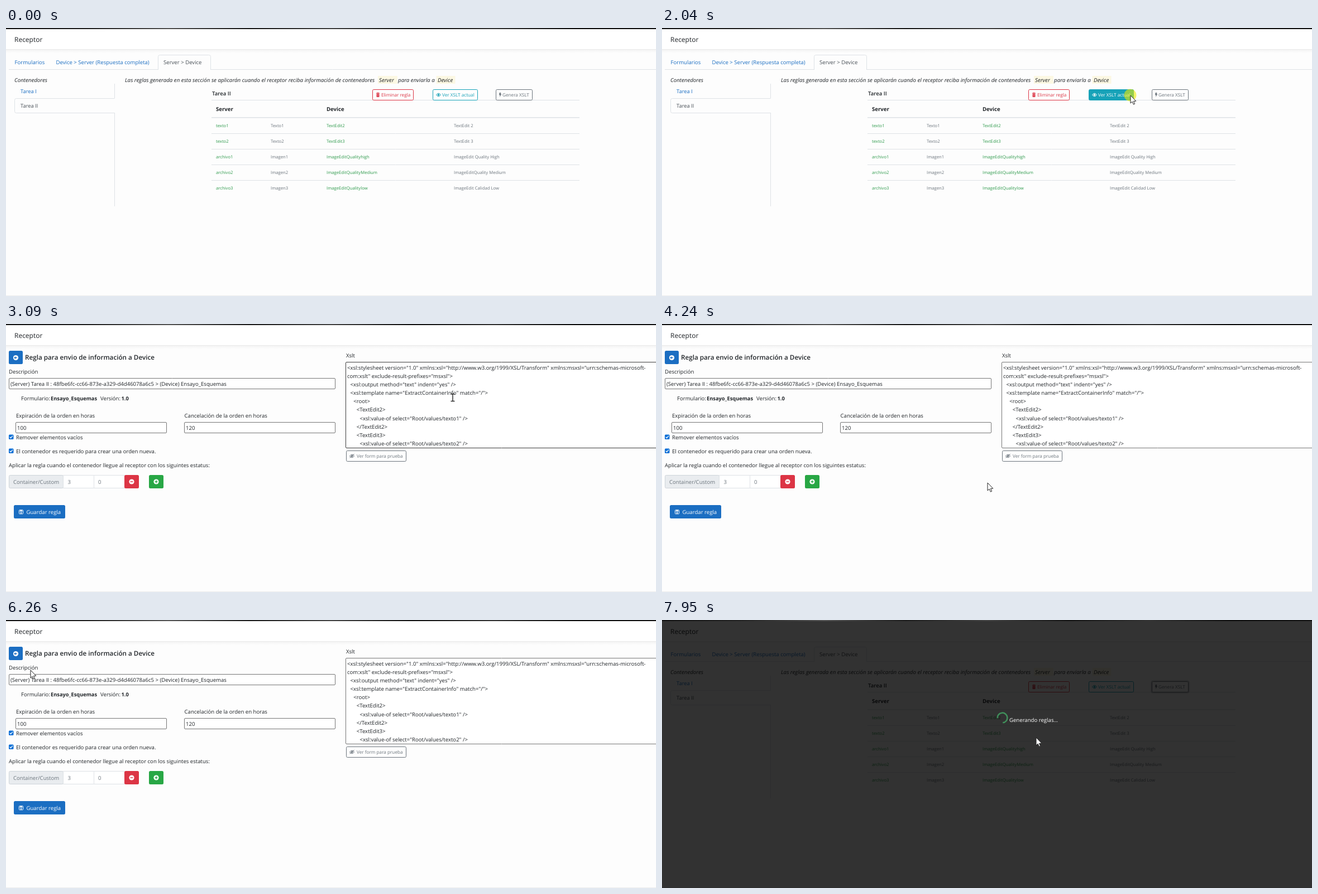
Write an HTML page with a canvas that moves like this. It is 1164x481 px and loops after 8000 ms.

```html
<!DOCTYPE html>
<html lang="es">
<head>
<meta charset="utf-8">
<title>Receptor</title>
<style>
html, body { margin: 0; width: 100%; height: 100%; overflow: hidden; background: #fdfdfd; }
canvas { display: block; width: 1164px; height: 481px; }
</style>
</head>
<body>
<canvas id="stage" width="1164" height="481"></canvas>
<script>
const ctx = document.getElementById('stage').getContext('2d');
const W = 1164, H = 481, LOOP = 8000;
const FAMILY = '"Open Sans", "Noto Sans", sans-serif';
const BASE = 9.6, SMALL = 8.2, CELL = 7.7;
const INK = '#212529', GRAY = '#6c757d', LINE = '#dee2e6', BLUE = '#1b6ec2';
const RED = '#dc3545', TEAL = '#17a2b8', GREEN = '#28a745', PAPER = '#fdfdfd';

// Scene times in ms
const LOAD = 2100, FORM = 2940, BACK = 6550, GENERATE = 7680;

// Pointer stops: time, x, y
const PATH = [
  [670, 1050, 470], [900, 985, 335], [1150, 890, 190], [1410, 826, 122],
  [1800, 834, 120], [2040, 839, 121], [2100, 838, 122], [2500, 808, 130],
  [2730, 805, 130], [3100, 800, 132], [3450, 440, 108], [3700, 480, 215],
  [3900, 578, 290], [4240, 583, 285], [4500, 680, 190], [4740, 560, 90],
  [4900, 400, 104], [5200, 190, 200], [5560, 97, 336], [5910, 92, 342],
  [6110, 92, 342], [6260, 44, 90], [6410, 19, 62], [6600, 19, 62],
  [6900, 260, 170], [7350, 860, 140], [7500, 912, 126], [7680, 913, 126],
  [7950, 670, 211]
];
const CLICKS = [[1950, LOAD], [6420, BACK], [7500, GENERATE]];

function pointer(t) {
  if (t < PATH[0][0]) return null;
  for (let i = 1; i < PATH.length; i++) {
    const [t0, x0, y0] = PATH[i - 1], [t1, x1, y1] = PATH[i];
    if (t <= t1) {
      const u = (t - t0) / (t1 - t0), k = u * u * (3 - 2 * u);
      return { x: x0 + (x1 - x0) * k, y: y0 + (y1 - y0) * k };
    }
  }
  const [, x, y] = PATH[PATH.length - 1];
  return { x, y };
}

const inside = (p, x, y, w, h) => !!p && p.x >= x && p.x <= x + w && p.y >= y && p.y <= y + h;

// y is the middle of the capitals
function text(s, x, y, color = INK, size = BASE, style = '400') {
  ctx.font = `${style} ${size}px ${FAMILY}`;
  ctx.fillStyle = color;
  ctx.fillText(s, x, y + size * 0.36);
}

function rect(x, y, w, h, fill, stroke, r = 0) {
  ctx.beginPath();
  ctx.roundRect(x, y, w, h, r);
  if (fill) { ctx.fillStyle = fill; ctx.fill(); }
  if (stroke) { ctx.strokeStyle = stroke; ctx.lineWidth = 1; ctx.stroke(); }
}

function line(x0, y0, x1, y1, color = LINE, width = 1) {
  ctx.strokeStyle = color;
  ctx.lineWidth = width;
  ctx.beginPath();
  ctx.moveTo(x0, y0);
  ctx.lineTo(x1, y1);
  ctx.stroke();
}

function disc(x, y, r, color) {
  ctx.fillStyle = color;
  ctx.beginPath();
  ctx.arc(x, y, r, 0, Math.PI * 2);
  ctx.fill();
}

function polygon(points, fill, stroke) {
  ctx.beginPath();
  points.forEach(([x, y]) => ctx.lineTo(x, y));
  ctx.closePath();
  ctx.fillStyle = fill;
  ctx.fill();
  if (stroke) { ctx.strokeStyle = stroke; ctx.lineWidth = 1; ctx.lineJoin = 'round'; ctx.stroke(); }
}

const icons = {
  trash(x, y, c) {
    rect(x - 3, y - 3.5, 6, 1.2, c);
    rect(x - 1.2, y - 4.3, 2.4, 1, c);
    rect(x - 2.5, y - 1.8, 5, 5.8, c, null, 0.8);
    for (const d of [-1, 1]) line(x + d, y - 0.8, x + d, y + 3, 'rgba(255,255,255,.7)', 0.5);
  },
  eye(x, y, c) {
    ctx.strokeStyle = c;
    ctx.lineWidth = 1;
    ctx.beginPath();
    ctx.moveTo(x - 4, y);
    ctx.quadraticCurveTo(x, y - 5.5, x + 4, y);
    ctx.quadraticCurveTo(x, y + 5.5, x - 4, y);
    ctx.stroke();
    disc(x, y, 1.7, c);
  },
  hidden(x, y, c) {
    icons.eye(x, y, c);
    line(x - 4, y + 3, x + 4, y - 3.5, c);
  },
  bolt(x, y, c) {
    polygon([[x - 1.3, y - 4], [x + 1.4, y - 4], [x + 0.6, y - 1.4], [x + 2.4, y - 1.4],
      [x - 1, y + 4.2], [x - 0.2, y + 0.4], [x - 2, y + 0.4]], c);
  },
  floppy(x, y, c) {
    rect(x - 3.5, y - 3.5, 7, 7, null, c, 1);
    rect(x - 2, y - 3, 4, 2.2, c);
    disc(x, y + 1.4, 1.2, c);
  }
};

function outlineButton(b, hover, focus) {
  const ink = hover ? '#fff' : b.color;
  if (focus) {
    ctx.globalAlpha = 0.5;
    rect(b.x - 1, 109, b.w + 2, 22, null, b.color, 3);
    ctx.globalAlpha = 1;
  }
  rect(b.x + 0.5, b.y + 0.5, b.w - 1, b.h - 1, hover ? b.color : null, b.color, 2);
  icons[b.icon](b.x + b.ix, b.y + b.h / 2, ink);
  text(b.label, b.x + b.tx, b.y + b.h / 2 + 0.2, ink, SMALL);
}

const BUTTONS = [
  { label: 'Eliminar regla', icon: 'trash', color: RED, x: 656, y: 110, w: 74, h: 20, ix: 10, tx: 16 },
  { label: 'Ver XSLT actual', icon: 'eye', color: TEAL, x: 764, y: 110, w: 81, h: 20, ix: 10.5, tx: 17 },
  { label: 'Genera XSLT', icon: 'bolt', color: GRAY, x: 877, y: 110, w: 66, h: 20, ix: 8, tx: 12 }
];
const PREVIEW = { label: 'Ver form para prueba', icon: 'hidden', color: GRAY, x: 609, y: 227, w: 108, h: 20, ix: 10.5, tx: 19 };

const ROWS = [
  ['texto1', 'Texto1', 'TextEdit2', 'TextEdit 2'],
  ['texto2', 'Texto2', 'TextEdit3', 'TextEdit 3'],
  ['archivo1', 'Imagen1', 'ImageEditQualityhigh', 'ImageEdit Quality High'],
  ['archivo2', 'Imagen2', 'ImageEditQualityMedium', 'ImageEditQuality Medium'],
  ['archivo3', 'Imagen3', 'ImageEditQualitylow', 'ImageEdit Calidad Low']
];
const COLUMNS = [376, 474, 574, 802];

// Leading spaces set the indent
const CODE = [
  '<xsl:stylesheet version="1.0" xmlns:xsl="http://www.w3.org/1999/XSL/Transform" xmlns:msxsl="urn:schemas-microsoft-',
  'com:xslt" exclude-result-prefixes="msxsl">',
  ' <xsl:output method="text" indent="yes" />',
  ' <xsl:template name="ExtractContainerInfo" match="/">',
  '  <root>',
  '   <TextEdit2>',
  '    <xsl:value-of select="Root/values/texto1" />',
  '   </TextEdit2>',
  '   <TextEdit3>',
  '    <xsl:value-of select="Root/values/texto2" />'
];

function header() {
  ctx.fillStyle = PAPER;
  ctx.fillRect(0, 0, W, H);
  const shade = ctx.createLinearGradient(0, 38, 0, 45);
  shade.addColorStop(0, '#e6e6e6');
  shade.addColorStop(0.25, '#f5f5f5');
  shade.addColorStop(1, PAPER);
  ctx.fillStyle = shade;
  ctx.fillRect(0, 38, W, 7);
  rect(0, 2, W, 36, '#fff');
  text('Receptor', 15, 21, INK, 12);
  line(0, 480.5, W, 480.5, '#ececec');
}

function strip() {
  const g = ctx.createLinearGradient(0, 0, W, 0);
  ['#111', '#222', '#555', '#1a1a1a', '#444', '#111', '#333', '#0c0c0c', '#111']
    .forEach((c, i, all) => g.addColorStop(i / (all.length - 1), c));
  ctx.fillStyle = g;
  ctx.fillRect(0, 0, W, 2);
}

function rulesPage(p, focus) {
  line(5, 74.5, W, 74.5);
  rect(272.5, 48.5, 94, 30, PAPER, LINE, 3);
  rect(271, 75, 97, 5, PAPER);
  text('Formularios', 15.5, 62, BLUE);
  text('Device > Server (Respuesta completa)', 89.5, 62, BLUE);
  text('Server > Device', 282, 62, '#495057');

  const note = (s, x) => text(s, x, 93, INK, 9.75, 'italic 400');
  note('Contenedores', 15);
  line(194.5, 100, 194.5, 126);
  line(194.5, 152, 194.5, 320);
  ctx.beginPath();
  ctx.moveTo(194.5, 126.5);
  ctx.arcTo(15.5, 126.5, 15.5, 130, 3);
  ctx.arcTo(15.5, 152.5, 20, 152.5, 3);
  ctx.lineTo(194.5, 152.5);
  ctx.stroke();
  text('Tarea I', 26, 114, BLUE, 9.4);
  text('Tarea II', 26, 140, '#495057', 9.4);

  rect(666, 86, 35, 14, '#fcf8e3');
  rect(770.5, 86, 34, 14, '#fcf8e3');
  note('Las reglas generada en esta sección se aplicarán cuando el receptor reciba información de contenedores', 213);
  note('Server', 668);
  note('para enviarla a', 702);
  note('Device', 773);

  text('Tarea II', 369, 118, INK, BASE, '600');
  line(368, 129.5, 1027, 129.5);
  text('Server', 376, 146, INK, BASE, '700');
  text('Device', 574, 146, INK, BASE, '700');
  rect(368, 160, 659, 1.5, LINE);
  ROWS.forEach((row, i) => {
    const top = 161.5 + i * 27.9;
    if (inside(p, 368, top, 659, 27.8)) rect(369, top, 658, 27.8, 'rgba(0,0,0,.07)');
    if (i) line(368, Math.floor(top) + 0.5, 1027, Math.floor(top) + 0.5);
    row.forEach((s, c) => text(s, COLUMNS[c], top + 14.2, c % 2 ? GRAY : '#2e9a4c', CELL));
  });
  BUTTONS.forEach((b, i) => outlineButton(b, inside(p, b.x, b.y, b.w, b.h), focus === i));
}

function field(p, x, y, w, h, value) {
  rect(x + 0.5, y + 0.5, w - 1, h - 1, '#fff', inside(p, x, y, w, h) ? '#3c3c3c' : '#767676', 1.5);
  if (value) text(value, x + 3, y + h / 2 + 0.3);
}

function check(y, label) {
  rect(5, y - 4.5, 8.5, 8.5, '#0b6fd6', null, 1.5);
  ctx.lineJoin = 'miter';
  ctx.strokeStyle = '#fff';
  ctx.lineWidth = 1.3;
  ctx.beginPath();
  ctx.moveTo(6.8, y - 0.2);
  ctx.lineTo(8.6, y + 1.8);
  ctx.lineTo(11.8, y - 2.4);
  ctx.stroke();
  text(label, 18, y + 0.5);
}

function roundIcon(x, y, color, kind) {
  disc(x, y, 4.6, '#fff');
  line(x - 2.4, y, x + 2.4, y, color, 1.4);
  if (kind === 'plus') line(x, y - 2.4, x, y + 2.4, color, 1.4);
  if (kind === 'back') polygon([[x - 3.2, y], [x - 0.3, y - 2.6], [x - 0.3, y + 2.6]], color);
}

function solidButton(p, x, y, w, h, color, hoverColor) {
  rect(x, y, w, h, inside(p, x, y, w, h) ? hoverColor : color, null, 2.5);
}

function formPage(p) {
  solidButton(p, 5, 48, 25, 24, BLUE, '#155a9e');
  roundIcon(17.5, 60.5, BLUE, 'back');
  text('Regla para envio de información a Device', 34, 59.5, INK, 11.7, '600');
  text('Descripción', 5, 85.5);
  field(p, 5, 97, 585, 20, '(Server) Tarea II : 48fbe6fc-cc66-873e-a329-d4d46078a6c5 > (Device) Ensayo_Esquemas');
  text('Formulario:', 27, 134);
  text('Ensayo_Esquemas', 80, 134, INK, 9.3, '700');
  text('Versión:', 169, 134);
  text('1.0', 206.5, 134, INK, 9.3, '700');
  text('Expiración de la orden en horas', 18, 164.5);
  text('Cancelación de la orden en horas', 319.5, 164.5);
  field(p, 17, 176, 271, 20, '100');
  field(p, 319, 176, 271, 20, '120');
  check(203, 'Remover elementos vacíos');
  check(228, 'El contenedor es requerido para crear una orden nueva.');
  text('Aplicar la regla cuando el contenedor llegue al receptor con los siguintes estatus:', 5, 254);

  rect(5.5, 271.5, 97, 23, '#e9ecef', '#ced4da', 2);
  rect(102.5, 271.5, 55, 23, '#fff', LINE);
  rect(157.5, 271.5, 55, 23, '#fff', LINE);
  text('Container/Custom', 13, 283.5, GRAY);
  text('3', 110.5, 283.5, GRAY);
  text('0', 165, 283.5, GRAY);
  solidButton(p, 212, 271, 26, 24, RED, '#c02838');
  roundIcon(225, 283, RED, 'minus');
  solidButton(p, 256, 271, 26, 24, GREEN, '#218838');
  roundIcon(269, 283, GREEN, 'plus');

  solidButton(p, 14, 325, 92, 24, BLUE, '#155a9e');
  icons.floppy(27, 337.3, '#fff');
  text('Guardar regla', 36.5, 337.5, '#fff');

  text('Xslt', 609, 56.5);
  field(p, 608, 68, 570, 155);
  CODE.forEach((s, i) => {
    const code = s.trimStart();
    text(code, 611 + (s.length - code.length) * 5.6, 78.5 + i * 15.1);
  });
  outlineButton(PREVIEW, inside(p, PREVIEW.x, PREVIEW.y, PREVIEW.w, PREVIEW.h));
}

function overlay(message, elapsed, alpha) {
  rect(0, 2, W, H - 2, 'rgba(0,0,0,.8)');
  const gap = elapsed / 750 * Math.PI * 2;
  ctx.globalAlpha = alpha;
  ctx.strokeStyle = '#45b06a';
  ctx.lineWidth = 2.5;
  ctx.beginPath();
  ctx.arc(609.5, 175.5, 8.9, gap + Math.PI / 4, gap + Math.PI * 1.75);
  ctx.stroke();
  ctx.globalAlpha = 1;
  text(message, 622, 180, '#fff');
}

const cursors = {
  arrow() {
    polygon([[0, 0], [0, 14], [3.2, 11.2], [5.4, 16.2], [7.6, 15.2], [5.5, 10.4], [9.8, 10.2]], '#fff', '#222');
  },
  beam(dark) {
    const c = dark ? '#222' : '#fff';
    line(0, -6.5, 0, 6.5, c, 1.4);
    for (const y of [-6.5, 6.5]) line(-3.5, y, 3.5, y, c, 1.4);
  },
  hand() {
    polygon([[-1.5, 1], [0, 0], [1.4, 1], [1.6, 5.5], [4, 5.3], [6.5, 6.3], [8.8, 7.5],
      [8.8, 11.5], [7.2, 14], [7.2, 17], [0.6, 17], [0.2, 14.6], [-4.5, 9.8], [-4, 8.4], [-1.4, 10]], '#fff', '#222');
    for (const x of [2, 4.3, 6.5]) line(x, 6, x, 9, '#555', 0.7);
  }
};

function cursorKind(t, p, form, busy) {
  if (busy) return t < FORM && t > 2250 ? 'beam' : 'arrow';
  if (form) {
    if (inside(p, 608, 68, 570, 155) || inside(p, 5, 97, 585, 20)) return 'beam';
    if (inside(p, 14, 325, 92, 24) || inside(p, 5, 48, 25, 24)) return 'hand';
    return 'arrow';
  }
  return t > BACK && BUTTONS.some(b => inside(p, b.x, b.y, b.w, b.h)) ? 'hand' : 'arrow';
}

function draw(t) {
  const p = pointer(t);
  const form = t >= FORM && t < BACK;
  const fetching = t >= LOAD && t < FORM, generating = t >= GENERATE;
  const busy = fetching || generating;
  header();
  if (form) formPage(p);
  else rulesPage(busy ? null : p, fetching ? 1 : generating ? 2 : -1);
  if (fetching) overlay('Obteniendo regla...', t - LOAD, 1);
  if (generating) overlay('Generando reglas...', t - GENERATE, 0.75);
  strip();
  if (!p) return;
  if (CLICKS.some(([a, b]) => t >= a && t < b)) disc(p.x - 0.5, p.y - 0.5, 11, 'rgba(240,235,0,.58)');
  ctx.save();
  ctx.translate(p.x, p.y);
  cursors[cursorKind(t, p, form, busy)](form);
  ctx.restore();
}

ctx.textRendering = 'geometricPrecision';
const start = performance.now();
function tick() {
  draw((performance.now() - start) % LOOP);
  requestAnimationFrame(tick);
}
tick();
</script>
</body>
</html>
```
